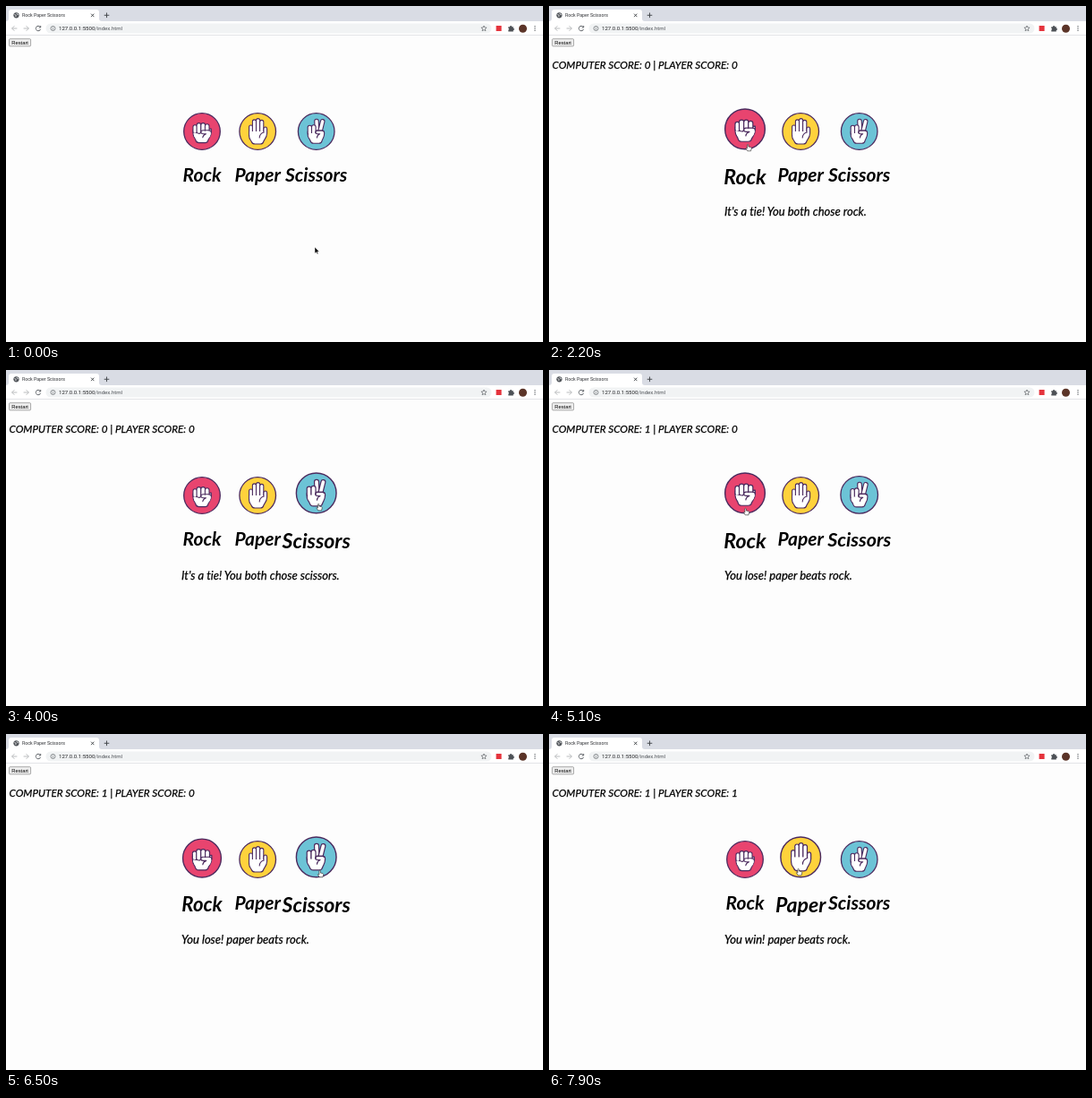
These frames come from a looping animation (600 px wide and 375 px high, 8 s). An HTML page:

```html
<!DOCTYPE html>
<html lang="en">
<head>
<meta charset="utf-8">
<title>Rock Paper Scissors</title>
<style>
html, body { margin: 0; width: 100%; height: 100%; overflow: hidden; background: #fdfdfd; }
svg { display: block; width: 600px; height: 375px; }
.ui { font-family: Roboto, "Liberation Sans", sans-serif; fill: #303236; }
.game { font-family: Lato, "Open Sans", sans-serif; font-style: italic; font-variant-ligatures: none; fill: #000; }
.line { stroke: #000; stroke-width: .25; }
.label { font-size: 21px; font-weight: 700; text-anchor: middle; }
.icon { fill: none; stroke: #5f6368; stroke-width: 1; }
.hand { fill: #fff; stroke: #4b2a5e; stroke-width: 1.1; stroke-linejoin: round; stroke-linecap: round; }
</style>
</head>
<body>
<svg viewBox="0 0 600 375">
  <!-- browser window -->
  <rect width="600" height="17" fill="#d9dce4"/>
  <path d="M0 17Q3 17 3 14V7Q3 4 6 4H101Q104 4 104 7V14Q104 17 107 17H600V32.5H0Z" fill="#fff"/>
  <rect y="32" width="600" height=".8" fill="#dcdee1"/>
  <circle cx="11.5" cy="10.3" r="3.1" fill="#505459"/>
  <path d="M9.4 9.2l1.8 1.2-.4 1.6M12 8l.6 1.4 1.2.4" class="icon" style="stroke:#fff;stroke-width:.8"/>
  <text class="ui" x="18" y="12.2" font-size="5.25">Rock Paper Scissors</text>
  <path class="icon" d="M95 8.7l3.4 3.4m0-3.4l-3.4 3.4M109.7 10.3h5.6m-2.8-2.8v5.6" style="stroke:#3c4043;stroke-width:.9"/>
  <path class="icon" d="M12.4 25H6.6m2.8-2.8L6.6 25l2.8 2.8M19.6 25h5.8m-2.8-2.8l2.8 2.8-2.8 2.8" style="stroke:#babcbe"/>
  <path class="icon" d="M38.2 23.4A2.7 2.7 0 1 0 38.6 25.9M38.7 22v2h-2"/>
  <rect x="44.5" y="19.5" width="498" height="11" rx="5.5" fill="#f1f3f4"/>
  <circle class="icon" cx="52.5" cy="25" r="2.5" style="stroke-width:.7"/>
  <path class="icon" d="M52.5 24.7v1.7m0-3v.6" style="stroke-width:.7"/>
  <text class="ui" x="59" y="27.2" font-size="6.07"><tspan fill="#202124">127.0.0.1:5500</tspan><tspan fill="#4d5156">/index.html</tspan></text>
  <path class="icon" d="M534 22l.9 2 2.2.2-1.7 1.4.5 2.2-1.9-1.2-1.9 1.2.5-2.2-1.7-1.4 2.2-.2Z" style="stroke-width:.7"/>
  <rect x="547.6" y="22" width="6" height="6" fill="#e5343d"/>
  <path d="M561.3 23.2h1.7a1.1 1.1 0 0 1 2.2 0h1.6v1.6a1.1 1.1 0 0 1 0 2.2v1.5h-5.5v-1.7a1 1 0 0 0 0-1.9Z" fill="#4d5156"/>
  <circle cx="577.5" cy="25.2" r="4.5" fill="#5b3428"/>
  <g fill="#5f6368"><circle cx="591" cy="22.7" r=".7"/><circle cx="591" cy="25" r=".7"/><circle cx="591" cy="27.3" r=".7"/></g>

  <!-- page -->
  <rect x="3.6" y="36.7" width="24" height="8.2" rx="1" fill="#efefef" stroke="#767676" stroke-width=".6"/>
  <text x="15.6" y="42.8" font-size="5.8" text-anchor="middle" font-family="Liberation Sans, sans-serif">Restart</text>
  <text class="game line" id="score" x="3.5" y="70" font-size="11.7"></text>
  <text class="game line" id="message" x="196" y="234" font-size="13"></text>
  <g id="choices"></g>
  <path id="arrow" d="M0 0V7.2L1.7 5.7 2.8 8.1 3.9 7.6 2.8 5.2H5Z" stroke="#fff" stroke-width=".5"/>
  <path id="pointer" d="M-1.6 1V-3.2Q-.9 -4.2 -.2 -3.2V-1L2.6 -.4Q3.4 0 3.2 1L2.5 3.8H-1.2L-3.2 .8Q-2.9 -.2 -1.6 1Z" fill="#fff" stroke="#222" stroke-width=".6"/>
</svg>
<script>
const LOOP = 8000, SHRINK = 400, PIVOT_Y = 166;
const $ = id => document.getElementById(id);

// A rounded finger: dark line below, white line above.
const finger = (x1, y1, x2, y2, w) => [['#4b2a5e', w + 1.1], ['#fff', w - 1.1]].map(([color, width]) =>
  `<path d="M${x1} ${y1}L${x2} ${y2}" stroke="${color}" stroke-width="${width}" stroke-linecap="round"/>`).join('');
const outline = d => `<path class="hand" d="${d}"/>`;
const crease = d => `<path class="hand" d="${d}" style="fill:none"/>`;
const cover = d => `<path d="${d}" fill="#fff"/>`;

const rock =
  outline('M-10 -2V2C-10 6 -7.8 7.5 -7.2 9.5C-6.6 12 -5.5 12.6 -3.5 12.6H3.5C5.5 12.6 6.4 12 6.8 9.8C7.3 7.5 10.3 6 10.3 1V-3Z') +
  finger(-7.8, -5, -7.8, 0, 4.5) + finger(-3.5, -7, -3.5, 0, 4.8) +
  finger(1.2, -7, 1.2, 0, 4.8) + finger(5.7, -6, 5.7, 0, 4.6) +
  cover('M-1 -.5H7.5Q10 -.5 9.8 3Q9.3 6 6.5 8.5L-6.5 8Q-9.2 6 -9.4 1.5L-1 3.5Z') +
  crease('M10.3 1Q10.3 -1.2 7.8 -1.2H1Q-1.2 -1 -1.2 .8Q-1 2.7 1 2.7H4.5Q1.2 3.8 .8 6.8');

const paper =
  finger(-7.6, -5, -7.6, 4, 4) + finger(-3.7, -11, -3.7, 3, 4.2) +
  finger(.4, -12.3, .4, 3, 4.2) + finger(4.5, -10.5, 4.5, 3, 4.2) +
  outline('M-9.6 1V5C-9.6 9 -7.6 9.5 -6.9 11.5C-6.2 13.6 -5 14 -3 14H3C5 14 6 13.4 6.5 11.5C7.2 9 10.4 7 10.4 2V-3Q10.2 -5 8.6 -5Q7 -5 6.7 -3V1') +
  cover('M-9 0H6.2V4H-9Z') +
  crease('M6.7 1Q2.2 2.5 2 7');

const scissors =
  finger(.3, -11.5, .8, 2, 4.5) + finger(7, -11.2, 3.7, 2, 4.5) +
  outline('M-9.5 0V4C-9.5 7.5 -7.5 8 -6.9 10C-6.2 12.6 -5 13.2 -3 13.2H3C5 13.2 6 12.4 6.4 10.3C7 8 9 7 9 2Q9 -1 6 -1H-2Z') +
  finger(-7.3, -4.5, -7.3, 1.5, 4.4) + finger(-2.9, -5, -2.9, 1.5, 4.6) +
  cover('M-8.8 2H5V6H-8.5Z') +
  crease('M8.6 0Q8 -1 6 -1H.8Q-1 -.8 -1 1Q-.8 2.8 1 2.8H4Q1 3.8 .7 7');

const choices = [
  ['Rock', 219, '#e8446f', rock],
  ['Paper', 281.2, '#ffd23c', paper],
  ['Scissors', 346.7, '#6cc3d6', scissors],
];
$('choices').innerHTML = choices.map(([name, x, color, art]) => `<g>
  <g transform="translate(${x} 140)"><circle r="20.3" fill="${color}" stroke="#4b2a5e" stroke-width="1.3"/>${art}</g>
  <text class="game label" x="${x}" y="196.4">${name}</text></g>`).join('');
const groups = [...$('choices').children];

// start time, hovered choice, pointer x, y
const hovers = [
  [600, 0, 223, 158],
  [2880, 2, 350, 153],
  [4900, 0, 220.5, 158],
  [6400, 2, 351.5, 156],
  [7450, 1, 279.5, 154],
];
// start time, computer, player, message
const results = [
  [900, 0, 0, "It's a tie! You both chose rock."],
  [3300, 0, 0, "It's a tie! You both chose scissors."],
  [5050, 1, 0, 'You lose! paper beats rock.'],
  [7000, 1, 0, "It's a tie! You both chose scissors."],
  [7700, 1, 1, 'You win! paper beats rock.'],
];
const current = (list, t) => list.filter(entry => entry[0] <= t).pop();

// Growth is immediate; shrinking eases out after the pointer leaves.
function growth(choice, t) {
  return Math.max(0, ...hovers.map(([start, item], k) => {
    if (item !== choice || t < start) return 0;
    const end = k + 1 < hovers.length ? hovers[k + 1][0] : LOOP;
    return t < end ? 1 : Math.max(0, 1 - (t - end) / SHRINK) ** 2;
  }));
}

function draw(now) {
  const t = now % LOOP;
  groups.forEach((group, i) => {
    const x = choices[i][1];
    group.setAttribute('transform',
      `translate(${x} ${PIVOT_Y}) scale(${1 + .1 * growth(i, t)}) translate(${-x} ${-PIVOT_Y})`);
  });

  const result = current(results, t);
  $('score').textContent = result ? `COMPUTER SCORE: ${result[1]} | PLAYER SCORE: ${result[2]}` : '';
  $('message').textContent = result ? result[3] : '';

  const hover = current(hovers, t);
  const p = Math.min(1, Math.max(0, (t - 100) / 600));
  const x = t < 700 ? 345 - 122 * p : hover[2];
  const y = t < 700 ? 269 - 111 * p : hover[3];
  for (const [id, shown] of [['arrow', !hover], ['pointer', hover]]) {
    $(id).setAttribute('transform', `translate(${x} ${y})`);
    $(id).style.display = shown ? '' : 'none';
  }
  requestAnimationFrame(draw);
}
draw(0);
</script>
</body>
</html>
```
